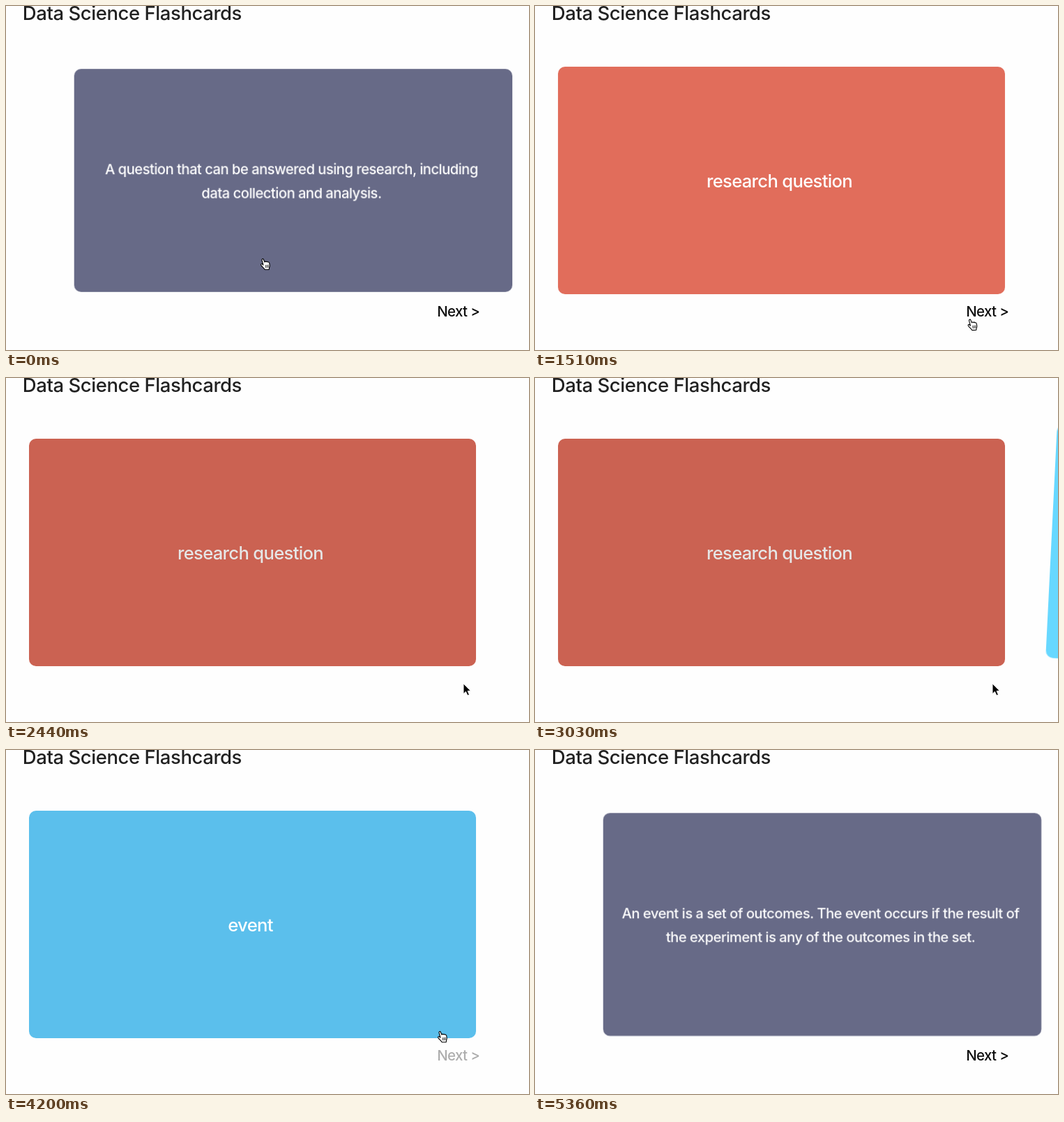
An HTML page that plays this animation: 750x493 px, repeating every 5.96 s.

```html
<!DOCTYPE html>
<html lang="en">
<head>
<meta charset="utf-8">
<title>Flashcards</title>
<style>
  html, body { margin: 0; width: 100%; height: 100%; overflow: hidden; background: #fefefe; }
  #stage {
    position: relative; width: 750px; height: 493px; overflow: hidden; background: #fefefe;
    font-family: Inter, "Liberation Sans", sans-serif; font-weight: 450; font-optical-sizing: none;
  }
  svg { position: absolute; left: 0; top: 0; overflow: visible; }
  .title { font-size: 27.5px; font-weight: 540; letter-spacing: -.016em; fill: #212121; }
  .next { font-size: 20.4px; letter-spacing: -.029em; fill: #0c0c0c; }
  .scene { position: absolute; left: 33px; top: 87px; width: 641px; height: 326px; perspective: 1000px; }
  .card {
    position: absolute; inset: 0; transform-style: preserve-3d;
    transform-origin: 350.3px 163px -10px;
  }
  /* A clear margin keeps the card's edge smooth when it turns. */
  .face { position: absolute; inset: -4px; backface-visibility: hidden; }
  .face svg { left: 4px; top: 4px; }
  .face text { text-anchor: middle; fill: #fff; letter-spacing: -.026em; }
  .front text { font-size: 25.6px; }
  .back { transform: rotateY(180deg); fill: #676a87; }
  .back text { font-size: 20.6px; }
  #red .front { fill: #e16d5b; }
  #blue .front { fill: #5bbfec; }
  #cursor { position: absolute; left: 0; top: 0; }
</style>
</head>
<body>
<div id="stage">
  <svg width="750" height="493">
    <text class="title" x="23.8" y="19.8">Data Science Flashcards</text>
    <text class="next" id="next" x="618.2" y="444.8">Next &gt;</text>
  </svg>
  <div class="scene" id="red"></div>
  <div class="scene" id="blue"></div>
  <div id="cursor">
    <svg width="20" height="20">
      <g id="hand" transform="translate(-4.5 -1)" stroke="#000" stroke-linejoin="round" stroke-linecap="round">
        <path fill="#fff" stroke-width="1.1" d="M4.2 7.5L3 3.2C2.6 1.4 4.6 .6 5.3 2.2L6.8 6C7 5 8.6 4.8 9.1 5.8
          C9.8 5 11 5.1 11.4 6.1C12.4 5.6 13.5 6.2 13.7 7.4L14.2 10.6C14.4 12.4 13.6 13.5 13.4 15L13.2 16.6
          L7.2 16.8C6.4 14.8 3.2 12.6 1.9 10.6C1 9 2.4 8 3.4 8.9L4.9 10.2Z"/>
        <path fill="none" stroke-width=".8" d="M8.2 10.5l.4 3.5M10.2 10.3l.3 3.5M12.1 10.1l.2 3.4"/>
      </g>
      <path id="arrow" stroke="#fff" stroke-width=".9" d="M0 0V14.6L3.4 11.4L5.9 17L8.4 15.9L6 10.6H10.4Z"/>
    </svg>
  </div>
</div>

<script>
  const LOOP = 5960, TICK = 116.5, LAST = 46;

  // Moments of the story, in ticks
  const FLIP_RED = 10.89, PRESS_NEXT = 21, SLIDE = 25.85, NEXT_BACK = 29, FLIP_BLUE = 38.69;
  const FLIP_LENGTH = 250 / TICK, SLIDE_LENGTH = 5;

  const $ = id => document.getElementById(id);
  const mix = (a, b, p) => a + (b - a) * p;
  const part = (n, start, length) => Math.min(1, Math.max(0, (n - start) / length));
  const smooth = p => p * p * (3 - 2 * p);

  // The CSS "ease" curve
  function ease(p) {
    const bezier = (a, b, s) => 3 * a * s * (1 - s) ** 2 + 3 * b * s * s * (1 - s) + s ** 3;
    let low = 0, high = 1;
    for (let i = 0; i < 24; i++) {
      const mid = (low + high) / 2;
      if (bezier(.25, .25, mid) < p) low = mid; else high = mid;
    }
    return bezier(.1, 1, high);
  }

  function face(side, x, y, lines) {
    const text = lines.map((line, i) => `<text x="${x}" y="${y + 34.5 * i}">${line}</text>`).join('');
    return `<div class="face ${side}"><svg width="641" height="326">
      <rect width="641" height="326" rx="10"/>${text}</svg></div>`;
  }

  function makeCard(id, term, ...meaning) {
    $(id).innerHTML = `<div class="card">${face('front', 317.5, 173.2, [term])}${face('back', 318, 154, meaning)}</div>`;
    return $(id).firstChild;
  }

  const red = makeCard('red', 'research question',
    'A question that can be answered using research, including', 'data collection and analysis.');
  const blue = makeCard('blue', 'event',
    'An event is a set of outcomes. The event occurs if the result of',
    'the experiment is any of the outcomes in the set.');

  const show = (el, opacity) => { el.style.opacity = +opacity; };
  const turn = (card, angle) => { card.style.transform = `rotateY(${angle}deg)`; };

  // Cursor moves: from tick, to tick, x, y
  const moves = [
    [0, 6, 604.5, 409], [6, 9, 572.5, 377], [11, 14, 642, 474], [14, 16, 659.5, 444],
    [16, 21, 656, 438], [32, 36, 622.5, 403], [39, LAST, 690, 512]
  ];

  function drawCursor(n, nextShown) {
    let x = 368.5, y = 362;
    for (const [from, to, toX, toY] of moves) {
      const p = smooth(part(n, from, to - from));
      x = mix(x, toX, p);
      y = mix(y, toY, p);
    }
    const overNext = nextShown && x > 618 && x < 681 && y > 426 && y < 450;
    const pointing = y < 413 || overNext;
    $('cursor').style.transform = `translate(${x}px, ${y}px)`;
    show($('hand'), pointing);
    show($('arrow'), !pointing);
  }

  function drawScene(n) {
    turn(red, 180 * (1 - ease(part(n, FLIP_RED, FLIP_LENGTH))));
    turn(blue, 180 * ease(part(n, FLIP_BLUE, FLIP_LENGTH)));

    const away = 1 - ease(part(n, SLIDE, SLIDE_LENGTH));
    const glow = .13 * (1 - ease(part(n, SLIDE, 8)));
    $('blue').style.transform = `translateX(${728 * away}px) rotate(${2.9 * away}deg) scale(${1 + .028 * away})`;
    $('blue').style.filter = `brightness(${1 + glow})`;
    $('red').style.filter = `brightness(${n < PRESS_NEXT ? 1 : .9})`;
    show($('blue'), n > SLIDE);
    show($('red'), n < SLIDE + 8);

    const nextShown = n < PRESS_NEXT || n >= NEXT_BACK;
    const waiting = n >= NEXT_BACK && n < FLIP_BLUE;
    show($('next'), nextShown ? (waiting ? .33 : 1) : 0);
    drawCursor(n, nextShown);
  }

  // The picture advances in even steps, then rests until the loop restarts.
  const start = performance.now();
  function draw() {
    const t = (performance.now() - start) % LOOP;
    drawScene(Math.min(LAST, Math.floor((t + 12) / TICK)));
    requestAnimationFrame(draw);
  }
  draw();
</script>
</body>
</html>
```
